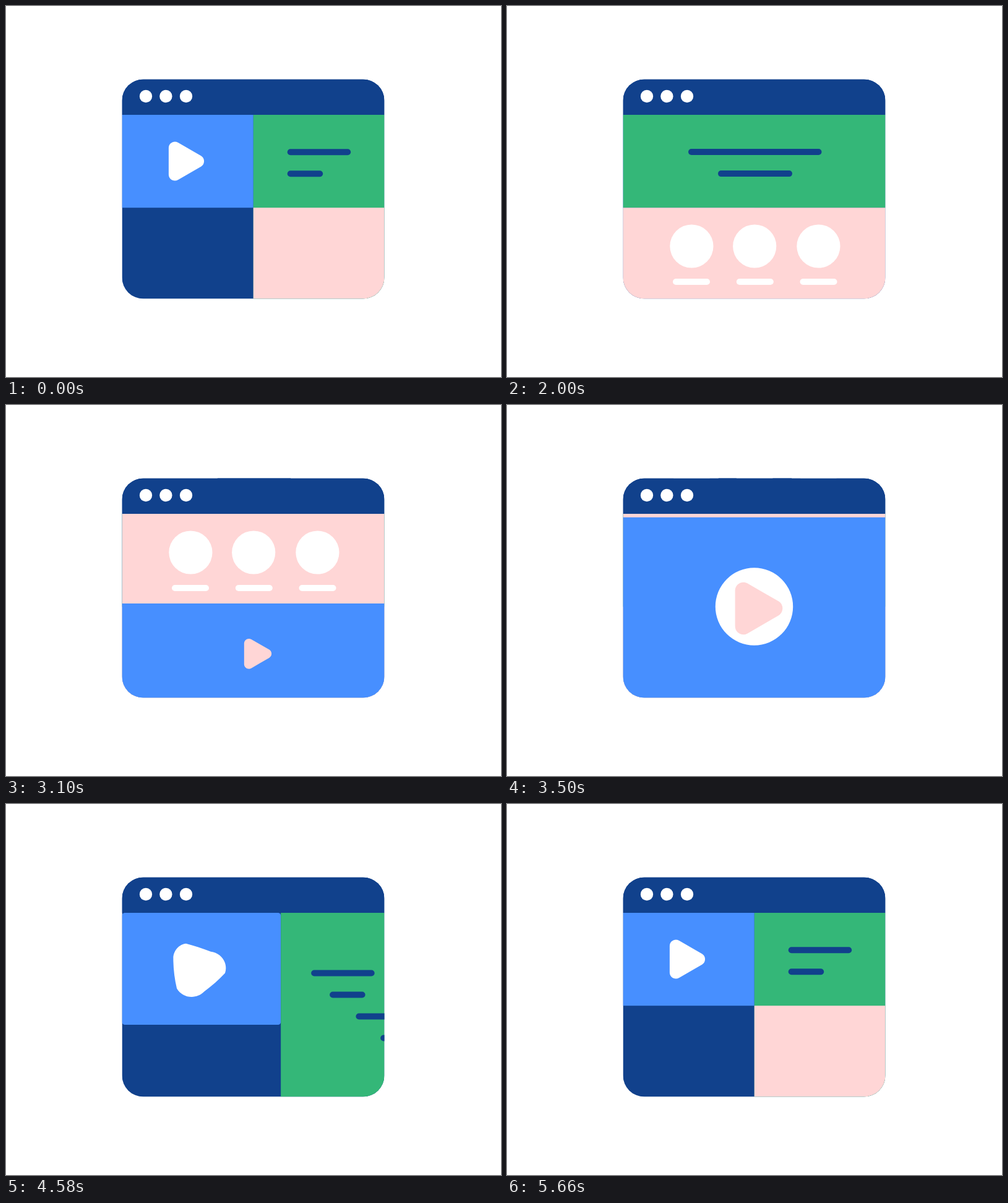
Write an HTML page that moves like this. It is 800 px wide and 600 px high and loops after 5840 ms.

```html
<!DOCTYPE html>
<html lang="en">
<head>
<meta charset="utf-8">
<title>Page builder</title>
<style>
  html, body { margin: 0; width: 100%; height: 100%; overflow: hidden; background: #fff; }
  svg { display: block; width: 100vw; height: 100vh; }
  .navy { fill: #11418c; }
  .blue { fill: #478fff; }
  .green { fill: #34b778; }
  .pink { fill: #ffd6d6; }
  .white { fill: #fff; }
</style>
</head>
<body>
<svg viewBox="0 0 800 600">
  <clipPath id="frame"><rect x="187.5" y="118.5" width="424" height="355" rx="34.5"/></clipPath>
  <g id="page" clip-path="url(#frame)"></g>
</svg>
<script>
const LOOP = 5840;
const LEFT = 187.5, RIGHT = 611.5, TOP = 176, BOTTOM = 473.5;
const MID_X = 399.75, MID_Y = 326.2;
const page = document.getElementById('page');

function set(node, attrs) {
  for (const key in attrs) node.setAttribute(key, attrs[key]);
}
function add(tag, color, attrs = {}) {
  const node = document.createElementNS('http://www.w3.org/2000/svg', tag);
  set(node, { class: color, ...attrs });
  return page.appendChild(node);
}
function box(node, x, y, right, bottom) {
  set(node, { x, y, width: Math.max(0, right - x), height: Math.max(0, bottom - y) });
}
// Round-ended bar of height 10, centred on y
function bar(node, x, y, width) {
  set(node, { x, y: y - 5, width: Math.max(0, width), height: 10, rx: Math.min(5, width / 2) });
}

const mix = (a, b, p) => a + (b - a) * p;
function ease(t, start, duration) {
  const x = Math.min(1, Math.max(0, (t - start) / duration));
  return x < 0.5 ? 4 * x ** 3 : 1 - 4 * (1 - x) ** 3;
}
function spring(t, start, half, damping) {
  const x = (t - start) / half;
  if (x <= 0) return 0;
  return x > 4 ? 1 : 1 - Math.exp(-damping * x) * Math.cos(Math.PI * x);
}

// Outlines run clockwise through nodes [cx, cy, radius, heading in degrees]
function outline(nodes) {
  const rad = Math.PI / 180;
  const at = ([cx, cy, r, h]) => [cx + r * Math.sin(h * rad), cy - r * Math.cos(h * rad)];
  const points = [at(nodes[0])];
  for (let i = 0; i < nodes.length - 1; i++) {
    const a = nodes[i], b = nodes[i + 1], p = at(a), q = at(b);
    const turn = (b[3] - a[3]) * rad;
    const reach = turn ? 4 / 3 * Math.tan(turn / 4) * a[2] : Math.hypot(q[0] - p[0], q[1] - p[1]) / 3;
    const step = (pt, h, d) => [pt[0] + d * Math.cos(h * rad), pt[1] + d * Math.sin(h * rad)];
    points.push(step(p, a[3], reach), step(q, b[3], -reach), q);
  }
  return points;
}
function morph(from, to, p) {
  const pts = from.map((a, i) => a.map((v, k) => mix(v, to[i][k], p).toFixed(2)).join(' '));
  return `M${pts[0]}C${pts.slice(1).join(' ')}Z`;
}
function triangle(x, y, scale) {
  const half = 21.5 * scale, depth = 18.6 * scale, r = 10 * scale;
  const a = [x - depth, y - half, r], b = [x + depth, y, r], c = [x - depth, y + half, r];
  return outline([[...a, -90], [...a, 30], [...b, 30], [...b, 150], [...c, 150], [...c, 270], [...a, 270]]);
}
const disc = outline([270, 324, 355, 450, 488, 587, 630].map(h => [399.5, 326, 101, h]));
const playIcon = triangle(291.5, 251, 1);

// Layers, back to front
add('rect', 'navy', { x: LEFT, y: 118.5, width: 424, height: 355 });
const video = add('rect', 'blue');
const blob = add('path', 'white');
const article = add('rect', 'green');
const lines = [102.5, 57.5, 102.5, 57.5].map(width => ({ width, node: add('rect', 'navy') }));
const team = add('rect', 'pink');
const members = [[298.4, 298], [400.2, 400.8], [503.4, 503.5]].map(([x, labelX]) => ({
  x, labelX, head: add('circle', 'white'), label: add('rect', 'white')
}));
const player = add('rect', 'blue');
const button = add('circle', 'white', { cx: 399.5, cy: 326 });
const play = add('path', 'pink');
add('rect', 'navy', { x: LEFT, y: 118.5, width: 424, height: TOP - 118.5 });
for (const cx of [226, 258.4, 291]) add('circle', 'white', { cx, cy: 146, r: 10.2 });

function drawGrid(t) {
  const p = ease(t, 4240, 545), lift = ease(t, 5160, 500);
  const edge = mix(RIGHT, MID_X, p);
  box(video, LEFT, TOP, edge, mix(BOTTOM, MID_Y, p));
  set(video, { rx: 28 * p * (1 - p) });
  set(blob, { d: morph(disc, playIcon, p) });
  box(article, edge, TOP, RIGHT, BOTTOM);
  lines.forEach(({ node, width }, i) => {
    const x = 454.7 + 212 * (1 - ease(t, 4240 + 40 * i, 530));
    bar(node, x, 273.5 + 35 * i - (i < 2 ? 37.3 * lift : 0), width);
  });
  box(team, MID_X, mix(BOTTOM, MID_Y, lift), RIGHT, BOTTOM);
  for (const { head, label } of members) {
    set(head, { r: 0 });
    bar(label, 0, 0, 0);
  }
  box(player, LEFT, BOTTOM, RIGHT, BOTTOM);
  set(button, { r: 0 });
  const shape = triangle(mix(407, 291.5, p), mix(326, 251, p), 1.365 * (1 - ease(t, 4240, 230)));
  set(play, { d: morph(shape, shape, 0) });
}

function drawScroll(t) {
  const widen = ease(t, 200, 500), grow = ease(t, 230, 650);
  const teamWiden = ease(t, 250, 500);
  const scroll = ease(t, 2000, 570), up = ease(t, 3100, 510);
  const shift = 150 * ease(t, 2040, 584) + 145 * up;

  box(video, LEFT, TOP, MID_X, MID_Y);
  set(video, { rx: 0 });
  set(blob, { d: morph(playIcon, playIcon, 0) });
  box(article, mix(MID_X, LEFT, widen), TOP, RIGHT, MID_Y);
  bar(lines[0].node, mix(454.7, 293, grow), 236 - 150 * scroll, mix(102.5, 215.5, grow));
  bar(lines[1].node, mix(454.7, 341, grow), 271.1 - 150 * scroll, mix(57.5, 120, grow));
  bar(lines[2].node, 0, 0, 0);
  bar(lines[3].node, 0, 0, 0);
  box(team, mix(MID_X, LEFT, teamWiden), mix(MID_Y, TOP, scroll), RIGHT, BOTTOM);

  // Members pop in from right to left
  members.forEach(({ x, labelX, head, label }, i) => {
    const pop = spring(t, [620, 578, 545][i], 200, 2.4);
    const riseStart = 1300 - 40 * i;
    const width = 60 * ease(t, riseStart, 260);
    set(head, { cx: x, cy: 401 - 12.5 * spring(t, riseStart, 100, 1.1) - shift, r: 35.1 * pop });
    bar(label, labelX - width / 2, 446 - shift, width);
  });

  const rise = ease(t, 2100, 590);
  box(player, LEFT, mix(mix(BOTTOM, 321, rise), TOP, up), RIGHT, BOTTOM);
  set(button, { r: 101 * ease(t, 3180, 590) });
  const size = mix(0.775 * spring(t, 2580, 150, 2.4), 1.365, up);
  const shape = triangle(407, mix(402.3, 326, up), size);
  set(play, { d: morph(shape, shape, 0) });
}

function tick() {
  const now = performance.now() % LOOP;
  const t = now < 200 ? now + LOOP : now;
  (t < 4240 ? drawScroll : drawGrid)(t);
  requestAnimationFrame(tick);
}
tick();
</script>
</body>
</html>
```
